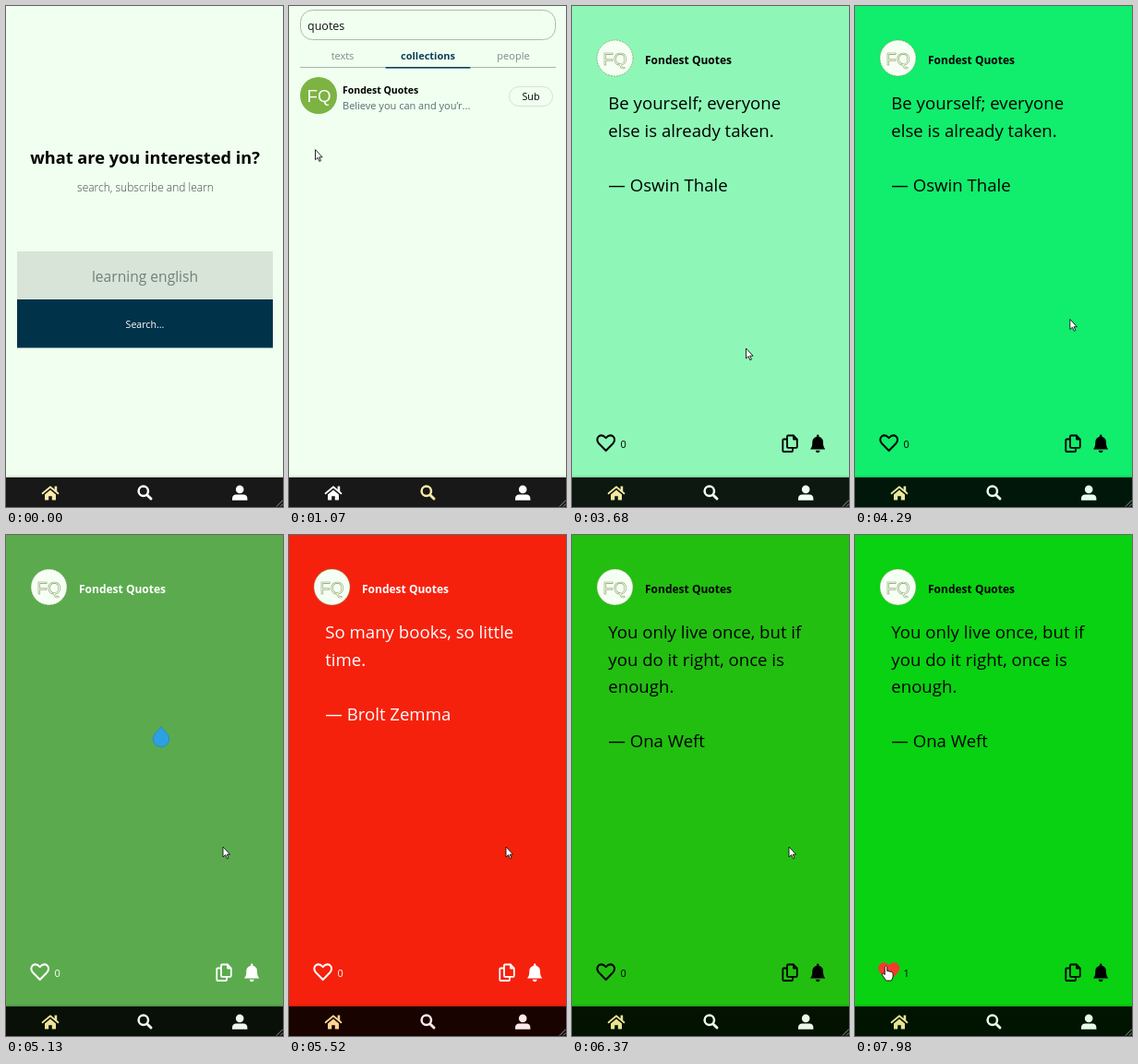
These frames come from a looping animation (300 by 543 pixels, 8000 ms). An HTML page:

```html
<!DOCTYPE html>
<html lang="en">
<head>
<meta charset="utf-8">
<title>Quotes app</title>
<style>
  html, body { margin: 0; width: 100%; height: 100%; overflow: hidden; background: #f0fff0; }
  svg { display: block; width: 100vw; height: 100vh; font-family: "Open Sans", "Noto Sans", sans-serif; }
  .mid { text-anchor: middle; }
  .bold { font-weight: 700; }
  .line { fill: none; stroke: currentColor; stroke-width: 2; stroke-linejoin: round; stroke-linecap: round; }
  .face { font-family: "Liberation Sans", sans-serif; font-size: 18.7px; }
  #card { fill: currentColor; }
  #nav { opacity: .9; }
  #nav g { fill: currentColor; }
  #bar { filter: drop-shadow(0 0 1.5px rgba(0, 0, 0, .5)); }
</style>
</head>
<body>
<svg viewBox="0 0 300 543">
  <rect id="back" width="300" height="543"/>

  <g id="home">
    <text class="mid bold" x="150.5" y="171" font-size="18.2">what are you interested in?</text>
    <text class="mid" x="151" y="201" font-size="12" font-weight="300" fill="#444">search, subscribe and learn</text>
    <rect x="12" y="266" width="277" height="52" fill="#d7e4d7"/>
    <text class="mid" x="150.5" y="298.5" font-size="15.6" fill="#71817b">learning english</text>
    <rect x="12" y="318" width="277" height="52.5" fill="#003349"/>
    <text class="mid" x="150.5" y="349" font-size="10.6" fill="#fff">Search...</text>
  </g>

  <g id="search">
    <rect x="12.5" y="4.5" width="276" height="32" rx="13" fill="none" stroke="#b0bab0"/>
    <text id="query" x="20" y="26" font-size="12.5" fill="#111"></text>
    <g id="tabs" class="mid" font-size="11"></g>
    <g id="result">
      <circle cx="32" cy="97" r="20" fill="#7cb342"/>
      <text class="mid face" x="32.5" y="104" fill="#fff">FQ</text>
      <text class="bold" x="58" y="95" font-size="10.5">Fondest Quotes</text>
      <text x="58" y="111.5" font-size="11" fill="#52706f">Believe you can and you’r...</text>
      <rect x="238.5" y="87.5" width="47" height="21" rx="10.5" fill="none" stroke="#d8e3d0"/>
      <text id="sub" class="mid" x="262" y="102" font-size="10.7"></text>
    </g>
  </g>

  <g id="card">
    <circle cx="46.5" cy="56.5" r="19.5" fill="#f6fff4" stroke="#7f9a55" stroke-width=".7" stroke-dasharray="2 1"/>
    <text class="mid face" x="46.5" y="63.5" fill="#fff" stroke="#7f9a55" stroke-width=".6">FQ</text>
    <text class="bold" x="79" y="62.5" font-size="12">Fondest Quotes</text>
    <g id="quote" font-size="18.6"></g>
    <path id="heart" class="line" d="M36.7 482L28.9 474C26.6 471.4 26.9 467.9 29.2 466.2C31.6 464.6 34.2 465.4 36.7 468.2C39.2 465.4 41.8 464.6 44.2 466.2C46.5 467.9 46.8 471.4 44.5 474Z"/>
    <text id="count" x="52.5" y="479" font-size="11"></text>
    <path class="line" style="stroke-width:1.8" d="M240 465.5H234q-1 0-1 1V477.8q0 1 1 1H242.8q1 0 1-1V469.5L240 465.5V469.5H243.8M232.5 469.5H229.3q-1 0-1 1V482q0 1 1 1H238q1 0 1-1V479.5"/>
    <path d="M258 480.5C260 478 260.3 476 260.3 472.5C260.3 469.5 262.5 467.3 265 466.8V465.6a1.2 1.2 0 0 1 2.4 0V466.8C270 467.3 272 469.5 272 472.5C272 476 272.4 478 274.3 480.5ZM263.8 481.8h4.8a2.4 2.4 0 0 1-4.8 0z"/>
  </g>

  <path id="drop" fill="#2d9fe3" stroke="#2a88bd" stroke-width=".8" d="M168 207.5C169 211 176.8 214.5 176.8 221A8.8 8.8 0 0 1 159.2 221C159.2 214.5 167 211 168 207.5z"/>

  <g id="nav">
    <rect id="bar" y="511" width="300" height="32"/>
    <g id="homeIcon">
      <path class="line" style="stroke-width:1.8" d="M39.6 528.3L48 521.2L56.4 528.3"/>
      <path d="M52.6 520.5h2.6v5.5h-2.6zM42 529.6L48 524.6L54 529.6V535.5H49.8V531.2H46.2V535.5H42z"/>
    </g>
    <g id="searchIcon">
      <circle class="line" cx="148.8" cy="525.8" r="5.2" style="stroke-width:2.5"/>
      <path class="line" d="M152.9 530L157 534" style="stroke-width:3"/>
    </g>
    <g color="#fff">
      <circle cx="253.2" cy="523.9" r="4.3"/>
      <path d="M245 535.8V534Q245 529.4 249.5 529.4H257Q261.4 529.4 261.4 534V535.8z"/>
    </g>
  </g>
  <path d="M293 542.5L300 535.5M297 542.5L300 539.5" stroke="#999" stroke-width="1"/>

  <g id="cursor" fill="#fff" stroke="#111" stroke-width=".9" stroke-linejoin="round">
    <path id="arrow" d="M0 0V11L2.6 8.7L4.4 12.8L6 12L4.2 8.2H7.6Z"/>
    <path id="hand" d="M-1.2 1.2q1.2-1.8 2.4 0V5.4l4.6 1q1.8.5 1.8 2.3V12L6 16H.2L-4 9.8q-.6-1.6 1.2-1.6L-1.2 9.6Z"/>
  </g>
</svg>
<script>
const LOOP = 8000, FADE = 500;
const el = id => document.getElementById(id);
const show = (id, on) => { el(id).style.display = on ? '' : 'none'; };
const clamp = x => Math.max(0, Math.min(1, x));
const within = (t, a, b) => t >= a && t < b;

const paper = [240, 255, 240];
const posts = [
  { start: 3462, ready: 3540, rgb: [17, 237, 109], ink: '#000',
    lines: ['Be yourself; everyone', 'else is already taken.', '', '— Oswin Thale'] },
  { start: 4970, ready: 5250, rgb: [246, 33, 13], ink: '#fff',
    lines: ['So many books, so little', 'time.', '', '— Brolt Zemma'] },
  { start: 5926, ready: 6200, rgb: [8, 210, 17], ink: '#000',
    lines: ['You only live once, but if', 'you do it right, once is', 'enough.', '', '— Ona Weft'] }
];

// pointer stops: time, x, y
const stops = [
  [1000, 24, 157], [1840, 247, 90], [2000, 247, 90], [2300, 188.5, 169],
  [2660, 53, 508], [3000, 53, 508], [3500, 188.5, 371], [3760, 188.5, 371],
  [4370, 235, 338], [6600, 235, 338], [7380, 35, 457], [7460, 35, 457], [7600, 33.5, 467]
];

function pointer(t) {
  const i = stops.findIndex(s => s[0] > t);
  if (i < 0) return stops[stops.length - 1].slice(1);
  const a = stops[Math.max(0, i - 1)], b = stops[i];
  const k = clamp((t - a[0]) / (b[0] - a[0] || 1)), e = k * k * (3 - 2 * k);
  return [1, 2].map(j => a[j] + (b[j] - a[j]) * e);
}

function background(t) {
  return posts.reduce((from, p) => {
    const k = clamp((t - p.start) / FADE);
    return from.map((v, i) => v + (p.rgb[i] - v) * k);
  }, paper).map(Math.round);
}

function drawTabs(active) {
  el('tabs').innerHTML = ['texts', 'collections', 'people'].map((name, i) => {
    const on = i === active, x = 12 + i * 92.5, ink = on ? '#0d3f58' : '#7b8b86';
    return `<text x="${x + 46}" y="58" fill="${ink}" ${on ? 'class="bold"' : ''}>${name}</text>
      <rect x="${x}" y="66" width="92" height="${on ? 1.6 : 1}" fill="${on ? '#0d3f58' : '#a9b5ac'}"/>`;
  }).join('');
}

function drawQuote(lines) {
  el('quote').innerHTML = lines.map((s, i) =>
    `<text x="39.3" y="${112.3 + i * 29.5}">${s}</text>`).join('');
}

function drawLike(t) {
  const liked = t >= 7560, k = clamp((t - 7560) / 360);
  const scale = liked ? 1 + .1 * k + .28 * Math.sin(Math.PI * k) : 1;
  const heart = el('heart');
  heart.setAttribute('transform', `translate(36.7 474) scale(${scale}) translate(-36.7 -474)`);
  heart.style.fill = liked ? '#f8392f' : 'none';
  heart.style.stroke = liked ? '#f8392f' : '';
  el('count').textContent = liked ? 1 : 0;
}

function draw(t) {
  const searching = within(t, 310, 2840);
  el('back').setAttribute('fill', `rgb(${background(t)})`);
  show('home', t < 310);
  show('search', searching);
  el('homeIcon').style.color = searching ? '#fff' : '#ffe8a0';
  el('searchIcon').style.color = searching ? '#ffe8a0' : '#fff';

  el('query').textContent = 'quotes'.slice(0, clamp((t - 310) / 460) * 6);
  drawTabs(t < 840 ? 0 : 1);
  show('result', t >= 920);
  el('sub').textContent = t < 2000 ? 'Sub' : 'Unsub';

  const post = posts.filter(p => t >= p.start).pop();
  const ready = post && t >= post.ready;
  show('card', post);
  show('drop', t >= 2920 && !ready);
  if (post) {
    el('card').style.color = post.ink;
    drawQuote(ready ? post.lines : []);
    drawLike(t);
  }

  const hand = within(t, 1760, 2080) || within(t, 2600, 3080) || t >= 7400;
  show('cursor', t >= 1000);
  show('hand', hand);
  show('arrow', !hand);
  el('cursor').setAttribute('transform', `translate(${pointer(t)})`);
}

const began = performance.now();
function tick() {
  draw((performance.now() - began) % LOOP);
  requestAnimationFrame(tick);
}
tick();
</script>
</body>
</html>
```
